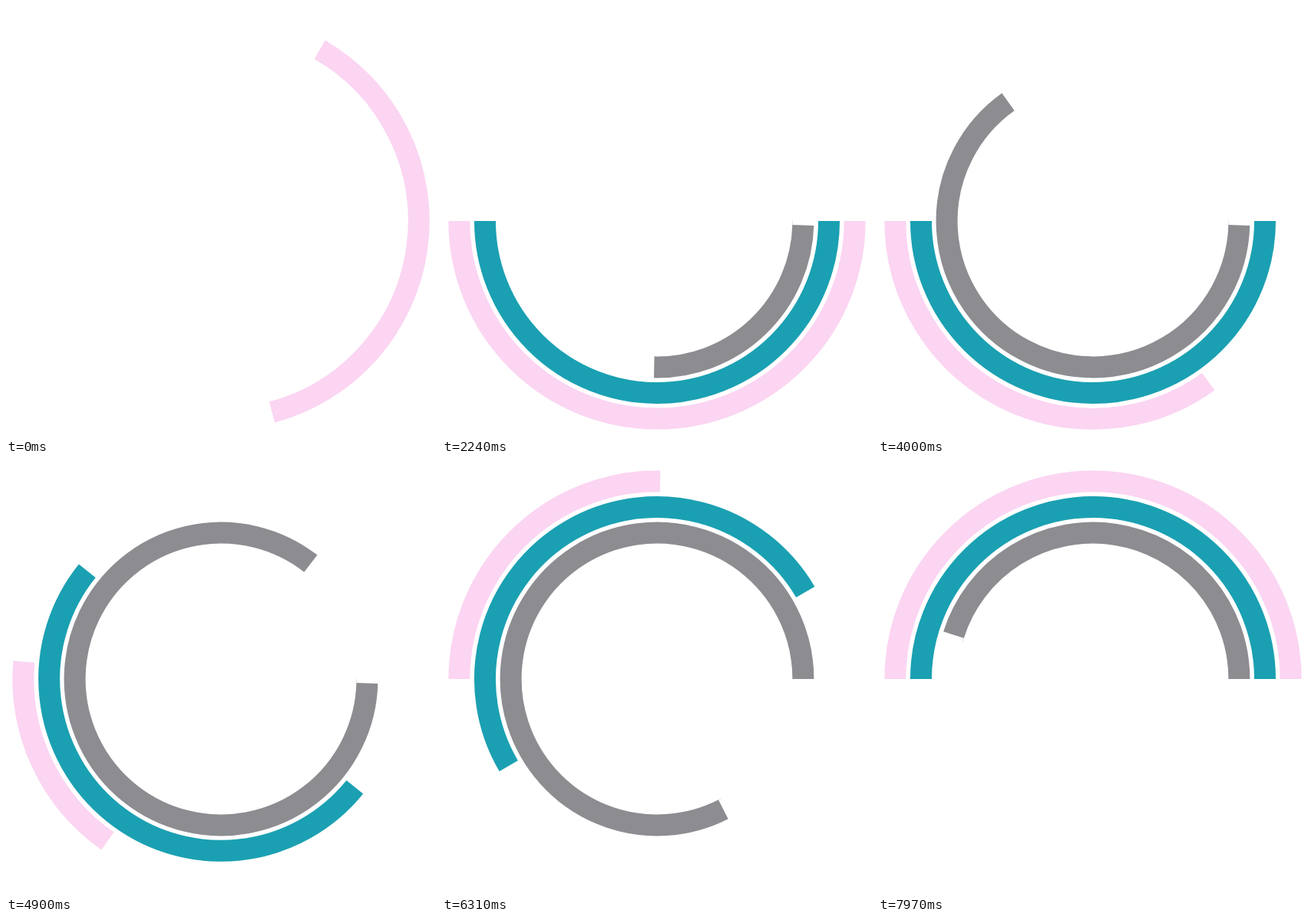
Animation, 560 px wide and 560 px high, one loop 8 s. Source, as an HTML page:

```html
<!DOCTYPE html>
<html lang="en">
<head>
<meta charset="utf-8">
<title>Three arcs</title>
<style>
  html, body { margin: 0; width: 100%; height: 100%; overflow: hidden; background: #fff; }
  svg { display: block; width: 100vw; height: 100vh; }
  path { fill: none; stroke-width: 28; }
  #hair { stroke-width: .7; opacity: .35; }
</style>
</head>
<body>
<svg viewBox="0 0 560 560">
  <path id="pink" stroke="#fbd5f2"/>
  <path id="teal" stroke="#1aa0b2"/>
  <path id="grey" stroke="#8d8c91"/>
  <path id="hair" stroke="#8d8c91"/>
</svg>
<script>
const LOOP = 8000;
const GAP = 1.66; // degrees left open at the start of the grey ring
const RADIUS = { pink: 257.6, teal: 224, grey: 190.4, hair: 176.6 };
const paths = {};
for (const id in RADIUS) paths[id] = document.getElementById(id);

// Linear move from a to b between two times, held outside them
function move(t, t0, t1, a, b) {
  const p = Math.min(1, Math.max(0, (t - t0) / (t1 - t0)));
  return a + (b - a) * p;
}

function point(r, deg) {
  const a = deg * Math.PI / 180;
  return (280 + r * Math.cos(a)).toFixed(3) + ' ' + (280 + r * Math.sin(a)).toFixed(3);
}

// Clockwise arc, angles measured from three o'clock
function arc(id, tail, head) {
  const r = RADIUS[id], span = head - tail;
  paths[id].setAttribute('d', span < 0.01 ? '' :
    `M${point(r, tail)}A${r} ${r} 0 ${span > 180 ? 1 : 0} 1 ${point(r, head)}`);
}

function draw(t) {
  arc('pink',
    move(t, 0, 764, -60.05, 0) + move(t, 3308, 5601, 0, 180),
    move(t, 0, 1136, 75.05, 180) + move(t, 4818, 7772, 0, 180));

  const turn = move(t, 4404, 6697, 0, 180);
  arc('teal', turn, turn + move(t, 109, 2057, 0, 180));

  const tail = move(t, 5553, 9973, GAP, 360);
  const head = move(t, 1142, 5540, GAP, 360);
  arc('grey', tail, head);
  arc('hair', tail - GAP, head > GAP ? tail : tail - GAP);
}

let start;
function tick(now) {
  if (start === undefined) start = now;
  draw((now - start) % LOOP);
  requestAnimationFrame(tick);
}
draw(0);
requestAnimationFrame(tick);
</script>
</body>
</html>
```
